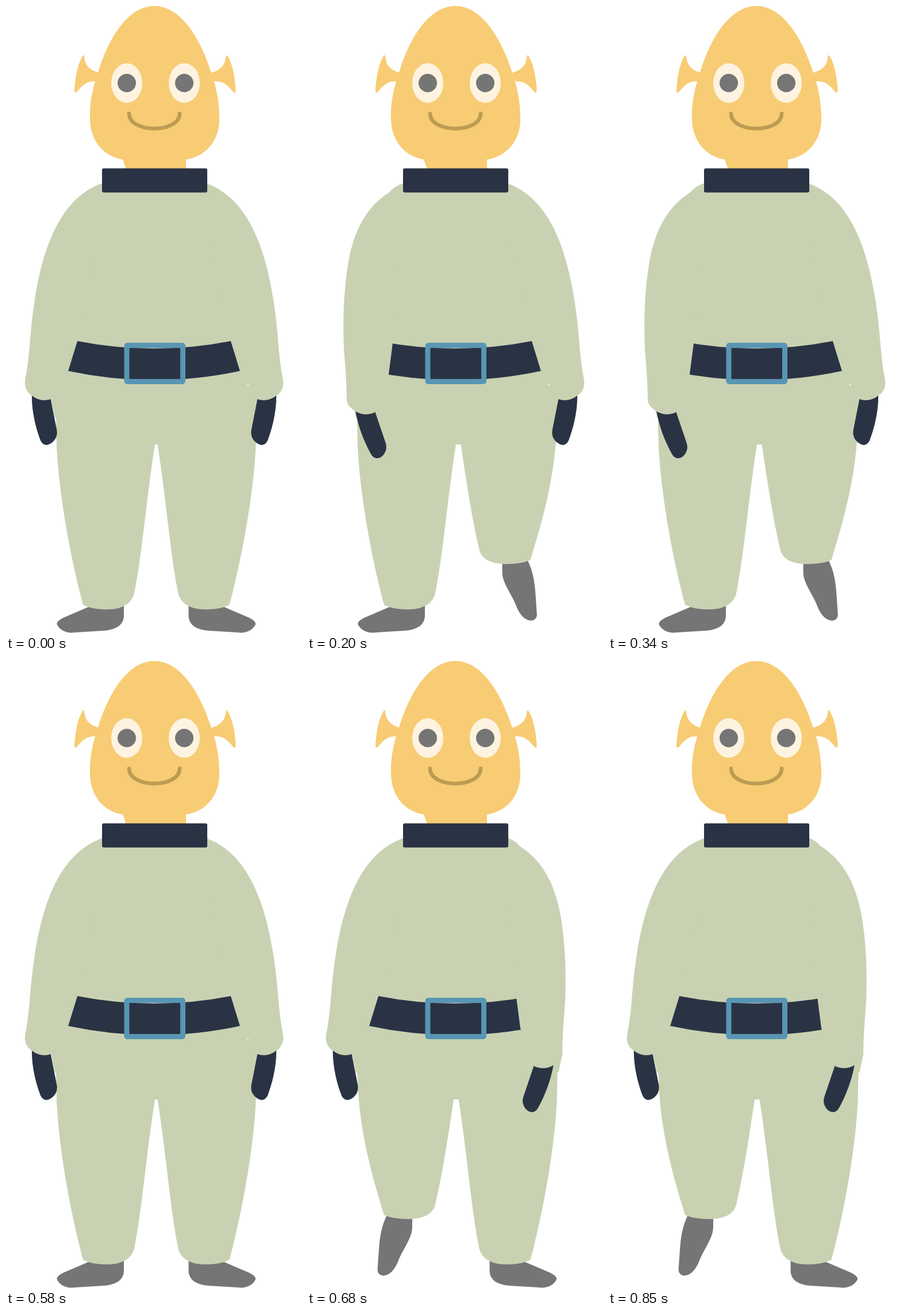
Animation of 513x1091 px, one loop 0.96 s. Source, as an HTML page:

```html
<!DOCTYPE html>
<html lang="en">
<head>
<meta charset="utf-8">
<title>Marching spaceman</title>
<style>
  html, body { margin: 0; height: 100%; overflow: hidden; background: #fff; }
  svg { display: block; width: 100vw; height: 100vh; }
  .suit { fill: #c8d2b2; }
  .navy { fill: #2a3344; }
  .grey { fill: #757575; }
  .skin { fill: #f7cc74; }
  .white { fill: #fef3e0; }
</style>
</head>
<body>
<svg viewBox="0 0 513 1091">
  <defs>
    <!-- left limbs; the right side mirrors them -->
    <g id="armDown">
      <path class="navy" d="M45 674C44 705 52 735 60 756C65 766 73 766 82 758C88 752 90 745 88 736L77 680Z"/>
      <path class="suit" d="M165 309C95 336 55 420 42 580Q39 622 33 652C32 664 36 672 45 678C55 686 67 688 78 684L108 635L124 583L165 400Z"/>
    </g>
    <g id="armSwung">
      <path class="navy" d="M84 702C88 730 100 760 112 781C118 790 127 788 133 781C139 773 139 766 136 758L117 702Z"/>
      <path class="suit" d="M165 309C158 312 152 315 148 319L142 325C112 344 84 378 72 445C60 515 63 590 66 620Q69 660 69 684C69 693 75 699 84 705C95 712 108 712 118 707L142 641L149 587L165 400Z"/>
    </g>
    <g id="legDown">
      <path class="grey" d="M145 1045L103 1063C91 1068 87 1073 89 1077C94 1086 105 1092 120 1090L170 1087C195 1085 205 1075 205 1060V1040Z"/>
      <path class="suit" d="M92 660L78 682L85 716H87L88 765C92 850 112 960 134 1042Q149 1050 175 1050C205 1050 219 1038 223 1022C236 960 245 850 259 763V660Z"/>
    </g>
    <g id="legRaised">
      <path class="grey" d="M140 962C126 990 126 1010 123 1055C121 1066 128 1071 136 1069C146 1067 152 1058 157 1048C165 1025 183 1005 183 985V962Z"/>
      <path class="suit" d="M92 660L78 682L85 716H87L88 725C90 815 112 892 134 964Q149 971 175 971C205 971 219 961 223 946C236 890 245 830 255 763V660Z"/>
    </g>
    <path id="ear" class="skin" d="M136 86C137 102 143 111 164 117L158 131C141 130 134 136 123 150Q119 152 119 147C120 125 125 98 134 86Z"/>
  </defs>

  <use id="leftLeg"/>
  <use id="rightLeg"/>
  <path class="suit" d="M165 309H350L420 500V700H272V763H268L255 763H250V700H92V500Z" id="torso"/>
  <path class="navy" d="M124 583Q258 609 391 583L407 635Q258 667 108 635Z"/>
  <rect x="210" y="590.5" width="97.5" height="63" rx="1" fill="none" stroke="#5896b4" stroke-width="9" stroke-linejoin="round"/>
  <use id="leftArm"/>
  <use id="rightArm"/>

  <use href="#ear"/>
  <use href="#ear" transform="translate(518.5) scale(-1 1)"/>
  <path class="skin" d="M258 0C215 0 180 50 160 116C150 145 145 170 146 197C147 235 170 262 203 267L209 284H313V267C347 262 371 235 371 197C371 170 367 145 357 116C336 50 301 0 258 0Z"/>
  <g class="white"><ellipse cx="210" cy="134" rx="27" ry="34.5"/><ellipse cx="310" cy="134" rx="27" ry="34.5"/></g>
  <g class="grey"><circle cx="210" cy="134" r="16"/><circle cx="310" cy="134" r="16"/></g>
  <path d="M214 187C214 222 302 222 302 187" fill="none" stroke="#bc9c52" stroke-width="6.5" stroke-linecap="round"/>
  <rect class="navy" x="167" y="282.5" width="183" height="42" rx="3"/>
</svg>
<script>
const el = id => document.getElementById(id);
const mirror = (x, y = 0) => `translate(${x} ${y}) scale(-1 1)`;

function setLimb(id, shape, transform = '') {
  el(id).setAttribute('href', '#' + shape);
  el(id).setAttribute('transform', transform);
}

// Step 1 swings the left arm and lifts the right leg; step 3 does the opposite.
function pose(step) {
  const a = step === 1, b = step === 3;
  setLimb('leftArm', a ? 'armSwung' : 'armDown');
  setLimb('rightArm', b ? 'armSwung' : 'armDown', b ? mirror(513, -2) : mirror(515));
  setLimb('leftLeg', b ? 'legRaised' : 'legDown');
  setLimb('rightLeg', a ? 'legRaised' : 'legDown', mirror(522.5));
}

const starts = [200, 440, 680];
const origin = performance.now();
let shown = -1;

function tick() {
  const t = (performance.now() - origin) % 960;
  const step = starts.filter(s => t >= s).length;
  if (step !== shown) pose(shown = step);
  requestAnimationFrame(tick);
}
tick();
</script>
</body>
</html>
```
